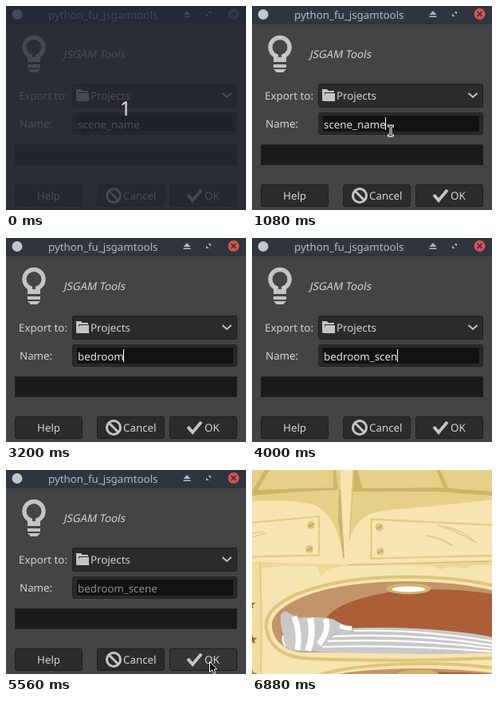
Write an HTML page that moves like this. It is 301x255 px and loops after 7.2 s.

```html
<!DOCTYPE html>
<html lang="en">
<head>
<meta charset="utf-8">
<title>Scene export</title>
<style>
  html, body { margin: 0; width: 100%; height: 100%; overflow: hidden; background: #444; }
  svg { display: block; width: 301px; height: 255px; }
  text { font: 13.333px "Noto Sans", sans-serif; fill: #d3d3d3; text-rendering: geometricPrecision; white-space: pre; }
  .box { fill: #2b2b2b; stroke: #1d1d1d; }
  .icon { fill: none; stroke: #c4c4c4; }
  .solid { fill: #c4c4c4; }
  .scratch { fill: none; stroke: #e3cb87; stroke-width: 1.6; }
  .rim { fill: #f8e4b0; stroke: #dcc67b; stroke-width: 4; }
</style>
</head>
<body>
<svg viewBox="0 0 301 255" xmlns="http://www.w3.org/2000/svg">
  <g id="dialog">
    <rect width="301" height="255" fill="#444"/>
    <rect width="301" height="23" fill="#2f343f"/>
    <circle cx="14" cy="10.5" r="6.5" fill="#c3c7cc"/>
    <text x="53" y="16" style="fill:#b4bac5">python_fu_jsgamtools</text>
    <path d="M222.5 11 227 6l4.5 5zM222.5 12.5h9v1.5h-9z" fill="#afb8c6"/>
    <path d="M253.5 7H257v3.5zM251 9.5V13h3.5z" fill="#afb8c6"/>
    <circle id="close" cx="285.5" cy="10" r="7"/>
    <path d="M282.5 7l6 6m0-6l-6 6" stroke="#2f343f" stroke-width="1.7"/>

    <circle class="icon" cx="35" cy="51.5" r="12" stroke-width="5.5"/>
    <path class="solid" d="M27 61H43V70H27zM27 73h16v4H27zM27 79h16l-4 4h-8z"/>
    <circle cx="35" cy="51.5" r="9.3" fill="#444"/>
    <path d="M33 58h4v6h-4z" fill="#444"/>
    <text transform="translate(72 65) skewX(-12)">JSGAM Tools</text>

    <text x="16" y="117">Export to:</text>
    <rect class="box" x="83.5" y="97.5" width="206" height="29" rx="2"/>
    <path class="solid" d="M88 104h6l2 2h7v2H91v9l-3 2z"/>
    <path class="solid" d="M92 109h12v10H89z"/>
    <text x="106" y="117">Projects</text>
    <path class="icon" d="M271.5 109l5.5 5 5.5-5" stroke-width="2"/>

    <text x="17" y="152">Name:</text>
    <rect x="83.5" y="133.5" width="206" height="27" rx="2" fill="#292929" stroke="#222"/>
    <rect x="89" y="137" width="196" height="20" fill="#121212"/>
    <rect id="mark" y="139" height="17" fill="#d9dddd"/>
    <text id="entry" x="90" y="153"><tspan></tspan><tspan></tspan></text>
    <rect id="caret" y="139" width="1" height="16" fill="#fff"/>

    <rect x="11.5" y="173.5" width="278" height="25" fill="#1a1a1a" stroke="#222"/>
    <rect class="box" x="11.5" y="223.5" width="84" height="27" rx="2"/>
    <rect class="box" x="114.5" y="223.5" width="84" height="27" rx="2"/>
    <rect class="box" id="ok" x="205.5" y="223.5" width="84" height="27" rx="2"/>
    <text x="39" y="242">Help</text>
    <text x="147" y="242">Cancel</text>
    <text x="249" y="242">OK</text>
    <path class="icon" d="M129 231l12 12" stroke-width="3"/>
    <circle class="icon" cx="135" cy="237" r="8.5" stroke-width="3"/>
    <path class="icon" d="M228 236l6 7 11-13" stroke-width="4"/>

    <g id="dim">
      <rect width="301" height="255" fill="#232733" opacity=".78"/>
      <text x="150" y="137" text-anchor="middle" style="font-size:25px;fill:#e0e0e0">1</text>
    </g>
  </g>

  <g id="room">
    <rect width="301" height="255" fill="#f8e4b0"/>
    <path d="M0 0H111L114 104C108 74 97 50 76 43Q40 36 0 39z" fill="#e6d088"/>
    <path d="M126 0H301V37C245 44 200 47 165 51C138 54 128 70 122 87z" fill="#e6d088"/>
    <path d="M0 25L102 22V0h3l3 25Q60 26 0 32zM16 0h6L7 25H1z" fill="#cfb468"/>
    <path d="M128 0h4l7 23 95-1 67 5v5l-67-5-107 0zM231 0h5l10 23h-5z" fill="#cfb468"/>
    <path d="M111 0H127L122 86 117 110H114z" fill="#f8e4b0"/>
    <path d="M109 24h2l5 86h-2L108 60z" fill="#cfb468"/>
    <path d="M126.5 0h1.5l-5 86-1.5 2z" fill="#d8c078"/>

    <g fill="#f8e4b0" stroke="#e3cb87" stroke-width="2.5">
      <path d="M-3 66L84 58V106.5L-3 108.5z"/>
      <path d="M149.5 61.5L304 69V107L149.5 110.5z"/>
    </g>
    <path class="scratch" d="M0 79l14-2M0 84l17-5M218 82q17 3 34 13q-14-11-34-13M233 69q24 8 49 22q-20-17-40-20"/>
    <g id="screws"></g>

    <path d="M0 115L120 118 301 113V119L278 119 266 123 250 120 236 124 226 119 120 120 98 123 86 132 82 121 40 120 10 123 0 120z" fill="#eed795"/>
    <path d="M120 118.5L301 114" fill="none" stroke="#d0b568" stroke-width="1.2"/>
    <path d="M0 118H11V255H0z" fill="#f3dca2"/>
    <path d="M10 116q3 70 1 139" fill="none" stroke="#e3cb87" stroke-width="2"/>
    <g id="stars" fill="#ab5d37"></g>

    <path class="rim" d="M306 145C240 130 150 129 84 146C36 159 15 178 18 198C21 220 38 232 62 235C130 239 220 238 306 235z"/>
    <path d="M304 151C245 136 150 135 90 150C45 162 23 180 25 196C27 215 43 226 62 228L304 229z" fill="#c49469"/>
    <path d="M88 196C92 176 120 163 160 155C205 147 255 148 301 155V218H92z" fill="#aa5f37"/>
    <ellipse cx="196.5" cy="148.2" rx="28" ry="7" fill="#cfb468"/>
    <ellipse cx="196.5" cy="149" rx="20.5" ry="3.6" fill="#fff"/>

    <path d="M118 198C160 196 205 197 245 201Q280 204 301 209V229Q190 232 78 227L94 210z" fill="#c9c9cb"/>
    <path d="M128 201Q210 199 301 214M101 208Q200 203 301 219M95 214Q200 210 301 223M88 221Q190 218 301 227" fill="none" stroke="#fff" stroke-width="2.2"/>
    <path d="M36 181Q41 174 46 179L58 185Q88 182 103 187Q112 194 126 195L124 200Q108 201 98 208Q88 218 79 226Q60 228 50 225L40 220Q38 215 40 207Q35 196 36 181z" fill="#c9c9cb"/>
    <g fill="none" stroke="#fff" stroke-width="8">
      <path d="M53 183Q61 204 57 225" stroke-width="7"/>
      <path d="M73 185Q78 207 70 226"/>
      <path d="M92 186Q98 200 84 218" stroke-width="7"/>
      <path d="M110 195Q117 198 125 198" stroke-width="5"/>
      <path d="M39 207Q37 214 42 220" stroke-width="2"/>
    </g>

    <path class="rim" d="M75 259C130 240 235 238 306 248V259z"/>
    <path d="M98 257C150 246 235 246 304 254V257z" fill="#c49469"/>
    <path d="M160 257Q225 249 301 255V257z" fill="#aa5f37"/>
    <ellipse cx="208" cy="256" rx="27" ry="6.5" fill="#cfb468"/>
  </g>

  <g id="arrow">
    <path d="M.5 .5V13.5L3.5 10.8 5.5 15.5 7.8 14.5 5.8 10H9.5z" fill="#000" stroke="#fff"/>
  </g>
  <g id="beam" fill="none">
    <path d="M-4-6h3l1 1 1-1h3M0-5V5M-4 6h3l1-1 1 1h3" stroke="#fff" stroke-width="3"/>
    <path d="M-3-6h2l1 1 1-1h2M0-5V5M-3 6h2l1-1 1 1h2" stroke="#111"/>
  </g>
  <g id="cross">
    <path d="M-8 .5h6M3 .5h6M.5-8v6M.5 3v6" stroke="#fff" stroke-width="2.4"/>
    <path d="M-8 .5h6M3 .5h6M.5-8v6M.5 3v6" stroke="#000"/>
    <path d="M17.5 10l3 3h-2v2.500h2.500v-2l3 3-3 3v-2h-2.500V20h2l-3 3-3-3h2v-2.500H14v2l-3-3 3-3v2h2.500V13h-2z" fill="#fff" stroke="#000" stroke-width="1.200"/>
  </g>
</svg>
<script>
const LOOP = 7200, STEP = 40;
const $ = id => document.getElementById(id);
const set = (id, attrs) => { for (const k in attrs) $(id).setAttribute(k, attrs[k]); };
const show = (id, on) => set(id, { display: on ? 'inline' : 'none' });
const clamp = v => Math.max(0, Math.min(1, v));
const ease = v => v * v * (3 - 2 * v);
const [plain, marked] = $('entry').children;

// [time, length of the typed text]
const typed = [[2400, 1], [2680, 3], [3000, 4], [3040, 5], [3200, 7],
  [3640, 9], [3880, 11], [4000, 12], [4520, 13]];
const NAME = 'bedroom_scene';

// [time, x, y]
const aim = [[600, 150, 262], [960, 168, 156], [1040, 168, 156], [1080, 174, 156],
  [1280, 174, 156], [1520, 83, 149], [1600, 96, 147], [1840, 209, 146],
  [1880, 211, 146], [2000, 194, 146]];
const press = [[4560, 197, 151], [4720, 197, 151], [4960, 290.5, 214], [5240, 255, 239]];
const leave = [[6480, 247, 238], [6860, 92, -14]];

function along(keys, t) {
  let i = 0;
  while (i < keys.length - 2 && t >= keys[i + 1][0]) i++;
  const [a, b] = [keys[i], keys[i + 1]];
  const k = ease(clamp((t - a[0]) / (b[0] - a[0])));
  return [a[1] + (b[1] - a[1]) * k, a[2] + (b[2] - a[2]) * k];
}

function place(id, point) {
  show(id, point);
  if (point) set(id, { transform: `translate(${point.map(Math.round)})` });
}

const widthTo = n => n ? $('entry').getSubStringLength(0, n) : 0;

function drawEntry(t) {
  const text = t < 2400 ? 'scene_name' : NAME.slice(0, typed.filter(k => k[0] <= t).pop()[1]);
  const picking = t >= 1600 && t < 2400;
  const from = !picking ? text.length : t < 1920 ? 1 : 0;
  let end = text.length;
  plain.textContent = text.slice(0, from);
  marked.textContent = text.slice(from);
  if (picking && t < 1800) {
    const x = along(aim, t)[0] - 90;
    while (end > from && widthTo(end) > x) end--;
  }
  const left = 90 + widthTo(from), right = 90 + widthTo(end);
  set('mark', { x: left, width: picking ? right - left : 0 });
  marked.style.fill = end < text.length ? '#777' : '#282828';
  plain.style.fill = t >= 5480 ? '#8c8c8c' : '#e0e0e0';
  set('caret', { x: Math.round(right - .5) });
  show('caret', !picking && t >= 480 && t < 5200);
}

function draw(t) {
  t = Math.floor(t / STEP) * STEP;
  const inRoom = t >= 6120;
  show('dialog', !inRoom);
  show('room', inRoom);
  let arrow = null, beam = null;
  if (!inRoom) {
    drawEntry(t);
    set('dim', { opacity: 1 - clamp((t - 240) / 480) });
    set('close', { fill: t < 480 ? '#77787c' : '#d9534f' });
    if (t >= 600 && t < 1080) arrow = along(aim, t);
    else if (t >= 1080 && t < 2400) beam = along(aim, t);
    else if (t >= 4560) {
      const p = along(press, t);
      if (p[1] < 161) beam = p; else arrow = p;
    }
    $('ok').style.fill = t >= 5440 && t < 5560 ? '#1f1f1f' : t >= 5120 ? '#353535' : '#2b2b2b';
  }
  place('arrow', arrow);
  place('beam', beam);
  place('cross', inRoom && t < 6880 ? along(leave, t) : null);
}

$('screws').innerHTML = [[74, 69], [72, 99], [159.5, 71.5], [161, 102]].map(([x, y]) =>
  `<circle cx="${x}" cy="${y}" r="4.8" fill="#dcc57c"/>
   <path d="M${x - 3} ${y + 2}l6-4" stroke="#b99c50" stroke-width="1.5"/>`).join('');

$('stars').innerHTML = [[-2, 168], [0, 212], [0, 256]].map(([x, y]) => {
  const pts = Array.from({ length: 10 }, (_, i) => {
    const r = i % 2 ? 3 : 6.5, a = i * Math.PI / 5 - Math.PI / 2;
    return [x + r * Math.cos(a), y + r * Math.sin(a)].map(v => v.toFixed(1));
  });
  return `<polygon points="${pts.join(' ')}"/>`;
}).join('');

function tick(now) {
  draw(now % LOOP);
  requestAnimationFrame(tick);
}
draw(0);
requestAnimationFrame(tick);
</script>
</body>
</html>
```
